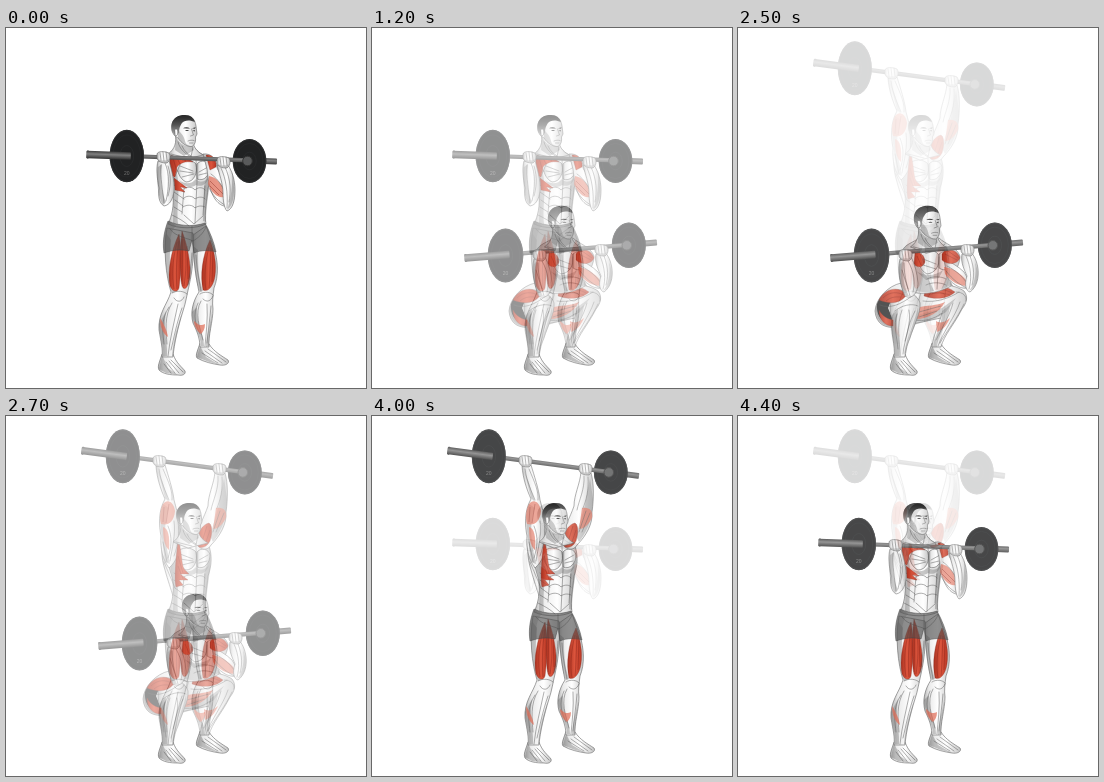
Recreate the animation shown at these times as an HTML page. Size 360 px wide and 360 px high, loop 4.5 s.

```html
<!DOCTYPE html>
<html lang="en">
<head>
<meta charset="utf-8">
<title>Barbell thruster</title>
<style>
html, body { margin: 0; width: 100%; height: 100%; overflow: hidden; background: #fff }
svg { display: block; width: 100vw; height: 100vh }
.m { fill: url(#skin); stroke: #666; stroke-width: .6; stroke-linejoin: round }
.r { fill: url(#red); stroke: #7c2a20; stroke-width: .3 }
.p { fill: #e06a52; opacity: .7 }
.l { fill: none; stroke: #4c4c4c; stroke-width: .6; stroke-linecap: round; opacity: .75 }
.f { fill: none; stroke: #7d1d14; stroke-width: .6; opacity: .6 }
.s { fill: #666; opacity: .36 }
.d { fill: #303030 }
.hair { fill: url(#hair) }
.shorts { fill: #4c4c4c; fill-opacity: .62; stroke: #444; stroke-width: .5 }
text { font: 5px Arial, "Liberation Sans", sans-serif; fill: #777; text-anchor: middle }
</style>
</head>
<body>
<svg viewBox="0 0 360 360">
  <defs>
    <linearGradient id="skin">
      <stop offset="0" stop-color="#b2b2b2"/><stop offset=".2" stop-color="#eaeaea"/>
      <stop offset=".55" stop-color="#fff"/><stop offset="1" stop-color="#c6c6c6"/>
    </linearGradient>
    <linearGradient id="red">
      <stop offset="0" stop-color="#a8301f"/><stop offset=".5" stop-color="#dc553d"/>
      <stop offset="1" stop-color="#b83623"/>
    </linearGradient>
    <linearGradient id="hair" x2="0" y2="1">
      <stop offset=".1" stop-color="#2c2c2c"/><stop offset=".5" stop-color="#555"/>
      <stop offset="1" stop-color="#aaa"/>
    </linearGradient>
    <linearGradient id="steel" gradientUnits="userSpaceOnUse" x1="0" y1="-3.5" x2="0" y2="3.5">
      <stop offset="0" stop-color="#444"/><stop offset=".4" stop-color="#808080"/>
      <stop offset="1" stop-color="#343434"/>
    </linearGradient>
  </defs>
  <g id="rack"></g>
  <g id="squat"></g>
  <g id="press"></g>
</svg>
<script>
const draw = cls => (...paths) => paths.map(d => `<path class="${cls}" d="${d}"/>`).join('');
const [muscle, red, pale, line, fibre, shade, dark] = [...'mrplfsd'].map(draw);
const moved = (x, y, art, k = 1) => `<g transform="translate(${x} ${y}) scale(${k})">${art}</g>`;

function plate(x, y, rx, ry) {
  const ring = (k, color, w) =>
    `<ellipse cx="${x}" cy="${y}" rx="${rx * k}" ry="${ry * k}" fill="none" stroke="${color}" stroke-width="${w}"/>`;
  return `<ellipse cx="${x}" cy="${y}" rx="${rx}" ry="${ry}" fill="#212223"/>` +
    ring(.97, '#333435', .8) + ring(.8, '#292a2b', .7) + ring(.4, '#2c2d2e', .7);
}

// Bar from (x1, y1) to (x2, y2) through plates [x, y, rx, ry]
function barbell(x1, y1, left, right, x2, y2) {
  const angle = Math.atan2(y2 - y1, x2 - x1) * 180 / Math.PI;
  const length = Math.hypot(x2 - x1, y2 - y1);
  const at = x => (x - x1) / (x2 - x1) * length;
  const rod = (a, b, h) =>
    `<rect transform="translate(${x1} ${y1}) rotate(${angle})" x="${a}" y="${-h / 2}" width="${b - a}" height="${h}" rx="1" fill="url(#steel)"/>`;
  const hub = at(left[0]), collar = at(right[0]);
  return rod(collar, length, 6) + plate(...right) + rod(hub, collar, 4.2) +
    `<circle cx="${right[0] - 2}" cy="${right[1]}" r="4.8" fill="#595a5b" stroke="#333"/>` +
    plate(...left) + rod(0, hub + 4, 7.5) + rod(0, 2.5, 8) +
    `<text x="${left[0]}" y="${left[1] + 19}">20</text>`;
}

const fist = (x, y) => moved(x, y,
  muscle('M-6 -3C-5 -6 1 -6 6 -4C8 -1 7 4 4 6C-1 6 -5 5 -6 1Z') +
  line('M-3 -4L-2 3M0 -5L1 4M3 -5L4 3') + shade('M-5 2C-1 4 3 4 6 2L4 6C-1 6 -4 5 -5 2Z'));

const head =
  muscle('M169 106C171 114 169 121 162 126L177 132L197 127C190 123 188 119 187 114Z') +
  shade('M170 108C173 117 181 119 187 118L188 122L178 128L169 122Z') +
  line('M172 114C174 122 180 126 185 129M176 118C178 123 182 126 185 128M187 119L185 129M165 126L181 130') +
  muscle('M166 100C165 92 171 87.5 178 87.5C185 87 189 91 190 98L191 106L189.5 109C190 113 189 117 186 118.5C181 119 175 115 172 110C168 108 166 105 166 100Z') +
  shade('M172 101C174 105 178 107 179 113C180 117 183 118 186 118.5C181 119 175 115 172 110Z') +
  draw('hair')('M166 104C163 93 170 87 178 87C184 86.5 188 90 189 94C184 91.5 178 92 176 95C174 98 173 100 173 105L169 107Z') +
  dark('M177 100.3C179 99 182 99 184 100.5L181 100.4Z', 'M186 100.3L189.6 99.3L189 100.8Z', 'M179 103C180 101.8 182 101.8 183 103Z', 'M186.5 102.8L189 102L188.5 103.5Z') +
  muscle('M168.5 102C169.5 100 172 101 172 104C172 107 170 109 169 107Z') +
  line('M185.5 101L187.5 107L184.5 108M182 113C184 112 186 112 188 112.5M183.5 115L187 115');

const feet =
  muscle('M156 326C154 333 151 338 153 342C157 346 164 347 172 347C177 348 180 346 179 343C176 339 170 335 167 326Z',
    'M194 315C192 322 189 327 191 330C198 334 207 336 214 337C220 338 224 335 222 332C216 328 208 324 203 316Z') +
  shade('M156 327L153 341L160 345L172 347L162 340Z', 'M194 318L191 329L203 334L214 337L200 329Z') +
  line('M160 334L169 345M163 333L173 345M165 332L177 344M158 336L165 345', 'M196 325L212 335M199 323L216 335M202 321L220 334');

const legs = feet +
  muscle('M187 207C187 230 190 250 193 264C187 273 184 284 187 295C191 303 194 311 194 319L203 319C202 308 207 293 207 281C206 274 207 268 208 260C213 248 212 232 208 220L200 198Z',
    'M161 200C157 222 160 248 165 264C161 277 152 285 153 302C155 314 157 321 156 329L167 329C168 316 172 299 177 283C180 274 181 266 183 258C187 240 188 225 187 205Z') +
  shade('M160 205C157 226 161 251 166 265L169 264C163 247 163 230 165 212Z', 'M153 296C154 310 158 318 157 328L161 328C162 313 157 306 160 283Z',
    'M187 218C188 246 191 257 194 264L197 263C192 248 192 237 192 222Z', 'M186 284C187 300 195 307 195 318L198 318C198 305 190 296 191 279Z',
    'M206 283C204 299 200 308 200 319L203 318C203 306 206 296 206 283Z', 'M176 285C169 303 167 317 166 328L167 328C168 316 173 299 176 285Z') +
  red('M173 206C165 222 161 245 164 258C167 265 172 264 173 260C175 245 176 222 173 206Z',
    'M176 203C182 218 185 238 184 249C182 261 178 263 176 258C173 245 174 220 176 203Z',
    'M204 212C196 228 194 248 197 262C203 265 208 256 209 248C211 236 208 222 204 212Z') +
  fibre('M171 214C166 234 166 248 168 261M173 213C170 232 170 248 171 261M178 211C181 229 180 246 178 258M176 211C177 230 176 245 176 256M181 218L182 251M203 219C199 235 198 250 200 262M205 220C204 239 204 250 203 260M207 224L206 254') +
  line('M186 225C185 241 183 250 182 257M190 227C191 245 194 256 195 263',
    'M166 265C171 262 178 263 181 266M168 270C171 275 176 274 178 269M194 266C198 263 205 264 207 267M197 271C201 275 205 273 207 268',
    'M172 276C168 295 164 310 162 328M166 275C158 288 160 303 161 316M176 280C170 297 168 310 165 322M163 279C154 292 157 306 158 316',
    'M201 276C202 291 200 306 199 318M195 273C188 285 194 300 197 312M205 278C204 292 202 302 201 315M192 275C186 288 190 297 194 306') +
  pale('M188 293C191 295 193 299 199 296C199 301 197 304 195 306C191 303 188 298 188 293Z', 'M154 290C158 296 161 303 162 309C157 306 154 299 154 290Z') +
  draw('shorts')('M162 193C172 198 188 199 199 195C204 204 208 214 210 224C203 222 195 222 188 225L186 212L183 223C175 221 166 222 158 225C156 212 159 201 162 193Z') +
  shade('M162 194C158 205 157 214 158 224L165 222C163 211 165 204 170 197Z') +
  line('M186 198L186 213M164 201C168 207 176 209 185 212M200 199C197 206 192 210 187 213');

const torso =
  muscle('M171 119C168 125 163 127 161 133C160 146 165 155 167 166C168 178 166 188 162 196C172 201 190 201 200 196C198 185 201 172 202 160C206 149 206 139 203 130C196 126 191 124 188 119Z') +
  shade('M162 134C164 155 169 164 167 195L172 196C170 174 176 160 169 138Z', 'M204 139L198 158L197 193L200 194C200 172 206 153 204 139Z',
    'M173 152C179 157 186 156 190 151C195 156 200 153 203 149C200 158 194 159 190 157C184 161 178 159 173 152Z') +
  muscle('M171 137C175 130 186 131 190 136C192 145 188 154 180 154C174 151 171 144 171 137Z',
    'M191 136C195 131 203 133 204 139C204 147 198 154 191 151Z') +
  line('M190 131L191 154L189 195M174 138L187 143M174 143L187 145M176 149L188 146M202 139L193 144M201 145L193 147',
    'M178 161C181 158 187 159 189 162C193 158 198 160 199 162M178 170C181 167 187 168 189 171C193 168 198 169 199 171',
    'M177 179C181 176 187 177 189 180C193 177 197 178 199 179M178 160L176 186M199 158L197 187M178 187L188 196L197 188',
    'M168 157L178 164M168 164L178 171M169 172L177 178M168 179L176 184M166 187C172 190 178 193 183 198');

const rack = torso + legs +
  muscle('M169 124C160 125 156 132 156 142C157 152 165 153 169 148L176 132Z',
    'M197 126C205 125 211 131 211 140C215 147 220 157 224 172C222 182 214 178 209 171C203 162 202 149 201 141Z') +
  red('M166 126C175 126 183 131 187 134C179 133 174 135 171 139L169 149L165 148C163 140 163 131 166 126Z', 'M200 127C207 126 211 133 210 139L204 142Z') +
  red('M168 150L176 156L181 160L174 159L179 164L169 162Z') +
  pale('M203 148C210 149 217 156 220 168C214 172 206 166 202 156Z') +
  fibre('M167 130L171 144M170 128L174 136M174 129L180 133M204 153L218 167M204 158L213 167') +
  line('M205 146C212 151 218 159 221 171M203 160C207 168 213 174 219 177') + head +
  barbell(80.5, 126.5, [120.8, 128, 17.2, 26.3], [243.5, 133, 16.8, 22], 271, 133.5) +
  muscle('M152 133C150 140 151 150 153 160C152 168 153 175 158 178C164 177 167 171 168 163C169 152 165 141 163 132Z',
    'M211 137C213 146 217 155 217 165C217 172 218 180 221 183C227 181 229 172 229 162C229 152 226 143 222 137Z') +
  shade('M152 139C150 154 152 169 157 177L160 174C155 163 154 148 156 136Z', 'M226 143C227 155 225 171 221 182C228 178 230 162 226 143Z') +
  line('M155 137C154 150 157 163 158 175M159 135C164 146 163 160 160 173M162 138C166 150 164 161 162 168', 'M215 140C220 151 222 164 221 180M219 139C225 152 225 164 223 174') +
  fist(157, 129) + fist(217, 134);

const squat = feet +
  // hips and far leg
  muscle('M163 255C150 258 138 270 137 283C138 296 147 301 160 299L203 290L224 272L212 254Z',
    'M183 263C197 254 216 256 226 263C231 269 228 276 224 281C216 297 206 307 203 319L194 319C195 307 201 297 204 285C196 291 186 294 176 292Z') +
  shade('M204 283C205 298 196 307 195 319L199 319C200 307 210 297 212 277Z', 'M162 292L204 280L218 270L208 284L197 291L172 298Z', 'M138 277C137 293 146 301 160 299L152 292Z') +
  red('M187 261C196 256 208 257 217 264C210 271 197 272 186 268Z') +
  pale('M178 280C189 277 199 278 207 274C202 284 190 291 178 291Z', 'M198 293C203 296 207 294 212 290C209 297 205 302 199 304Z') +
  fibre('M190 263C198 260 207 261 214 265M189 267C198 264 206 265 212 267') +
  line('M185 273C198 275 212 270 221 264M181 284L203 278M181 289L199 283M218 264C225 264 229 268 228 273M222 274C217 289 205 304 200 318M226 276C219 291 208 304 202 315M215 275C212 287 204 300 198 312') +
  // near leg
  dark('M139 276C143 266 149 264 155 268L150 280L155 292C145 296 138 289 139 276Z') +
  muscle('M157 262C169 261 180 267 182 275C183 285 175 299 172 310C168 319 168 324 167 329L156 329C158 318 152 305 154 290C151 283 151 271 157 262Z') +
  red('M141 272C147 260 160 258 169 266C164 275 153 277 141 272Z', 'M141 282C145 289 150 291 155 292L155 298C147 298 141 292 141 282Z') +
  fibre('M145 270C152 263 160 264 166 267M148 273C154 268 159 269 163 269') +
  shade('M154 287C151 301 158 314 157 328L161 328C163 313 157 303 160 281Z', 'M180 279C177 294 167 313 166 327L168 324C169 312 182 293 180 279Z') +
  line('M142 277C152 281 162 277 174 268M157 283C164 277 174 275 180 278M164 282C158 298 162 313 162 328M171 282C174 295 166 313 165 326M177 283C171 294 170 303 167 313M159 286C155 298 159 308 160 321') +
  // trunk
  muscle('M181 210C175 215 166 216 164 224C163 237 166 247 166 261C178 268 200 266 213 258C211 248 222 241 222 228C218 218 207 216 201 210Z') +
  shade('M171 234L173 261C181 265 191 265 196 263L190 250L180 238Z', 'M211 243L203 262L213 257Z', 'M178 243C187 249 197 248 205 242L201 250L188 252Z') +
  muscle('M181 228C186 220 197 221 201 227C202 239 197 245 189 246C182 242 179 235 181 228Z', 'M201 226C207 221 214 224 215 232C213 241 207 244 201 240Z',
    'M206 231C212 234 220 238 226 244L234 258C226 264 215 257 209 249Z') +
  red('M177 225C182 223 187 228 187 234C185 240 179 240 176 236Z', 'M204 226C208 219 219 221 222 230C219 237 209 237 204 232Z') +
  pale('M206 239C216 240 226 247 231 257C224 260 213 254 207 246Z') +
  fibre('M179 228L183 237M182 226L186 235M207 226L219 232M210 223L220 230') +
  line('M201 229L199 261M185 231L198 236M185 237L198 241M189 251C194 248 203 248 208 251M188 257C194 254 202 254 208 257M209 238C219 243 226 250 230 257M208 243C215 252 222 257 229 260M181 214L198 224M207 216L198 223') +
  moved(1.5, 86, head, 1.055) +
  barbell(92.5, 230, [133.5, 227.5, 17.8, 27], [256.8, 217.3, 17, 22.8], 285, 214.5) +
  muscle('M162 231C159 243 162 257 167 268C174 272 180 265 180 255C179 245 177 236 173 229Z',
    'M224 226C222 234 227 243 229 248C226 257 228 263 232 264C239 259 241 249 240 241C239 233 236 227 232 223Z') +
  shade('M162 236C159 249 164 263 168 268L171 268C164 256 165 245 166 232Z', 'M237 234C239 246 236 257 231 263C240 260 242 246 237 234Z') +
  line('M166 235C166 249 170 260 172 268M170 233C177 245 177 256 175 264M164 242L170 261', 'M228 228C233 239 234 252 231 261M232 228C237 241 236 250 234 257') +
  fist(167, 227) + fist(229, 222);

const press = muscle('M161 118C154 126 155 142 159 154C162 165 165 173 167 180L176 168L172 122Z') + torso + legs +
  muscle('M150 50C151 63 155 74 159 83C152 95 153 110 155 120C154 133 157 144 163 152C170 146 174 136 174 126C175 112 172 98 168 84C167 74 162 59 159 49Z',
    'M209 56C208 68 202 79 202 90C198 102 191 113 189 124C192 134 201 136 205 129C214 120 221 108 220 96C222 82 222 67 219 57Z') +
  shade('M157 88C152 103 156 119 159 146L164 148C160 129 156 109 163 92Z', 'M218 62L213 89L204 120L207 126C218 112 221 97 221 83Z', 'M152 54L159 82L163 86L157 67Z') +
  pale('M157 88C162 82 168 87 169 95C168 106 162 110 155 108C153 101 154 94 157 88Z', 'M157 111C162 112 164 120 163 134C158 130 157 121 157 111Z', 'M210 92C218 91 221 95 220 102C216 110 211 113 207 113Z') +
  red('M203 107C207 110 206 118 204 125C199 134 191 133 190 126C191 117 197 108 203 107Z',
    'M172 124C176 134 175 147 178 153L183 158L174 158L182 164L173 164L177 169L170 171C168 162 170 141 172 124Z') +
  fibre('M158 91L157 106M163 88L160 107M201 110L195 129M204 114L199 129M172 140L177 157M172 150L177 163') +
  line('M153 53C155 67 160 76 163 84M157 53C163 67 167 76 166 84M168 105C170 119 166 132 164 145M162 110C167 122 165 132 162 142M157 126L161 146M171 100C174 113 173 127 168 140',
    'M212 60C213 73 207 84 205 94M216 61C217 74 214 85 211 92M214 95L207 116M218 97L210 116M158 146L169 172') +
  moved(5, 0, head) +
  barbell(75.5, 34.5, [116.8, 40.3, 17, 27], [238.8, 56.4, 16.9, 22], 267, 60) +
  fist(153, 45) + fist(213, 53);

for (const [id, art] of Object.entries({ rack, squat, press }))
  document.getElementById(id).innerHTML = '<rect width="360" height="360" fill="#fff"/>' + art;

const layer = id => document.getElementById(id).style;
const squatLayer = layer('squat'), pressLayer = layer('press');
const start = performance.now();

function frame() {
  const t = (performance.now() - start) % 4500;
  // Each dissolve takes six hard steps of 100 ms
  const fade = from => Math.min(6, Math.max(0, Math.floor((t - from) / 100) + 1)) / 6;
  squatLayer.opacity = t < 3500 ? fade(1000) : 0;
  pressLayer.opacity = fade(2500) - fade(4000);
  requestAnimationFrame(frame);
}
frame();
</script>
</body>
</html>
```
